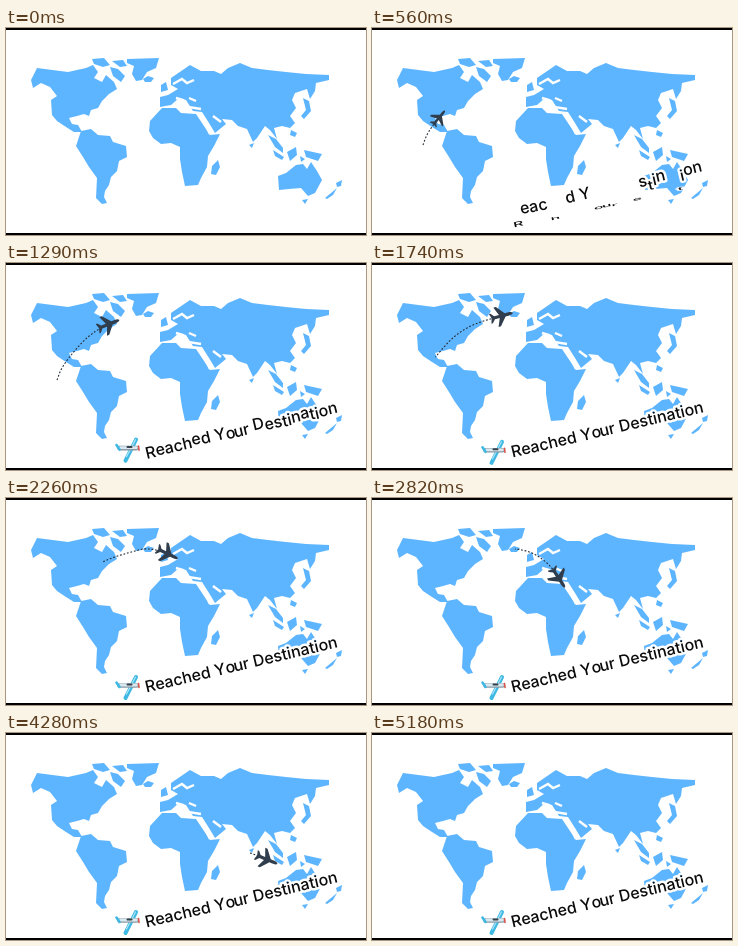
Write an HTML page with a canvas that moves like this. It is 360x207 px and loops after 5.21 s.

```html
<!DOCTYPE html>
<html lang="en">
<head>
<meta charset="utf-8">
<title>Reached Your Destination</title>
<style>
  html, body { margin: 0; width: 100%; height: 100%; overflow: hidden; background: #fff; }
  canvas { display: block; }
</style>
</head>
<body>
<canvas id="stage" width="360" height="207"></canvas>
<script>
const ctx = document.getElementById('stage').getContext('2d');
const LOOP = 5210;
const clamp = (v, lo = 0, hi = 1) => Math.min(hi, Math.max(lo, v));

const land = new Path2D([
  // North America, its islands and Greenland
  'M25 52L31 40 62 44 80 40 87 37 92 44 88 50 96 54 100 47 108 54 111 61 103 66 96 73 92 80 85 82 83 88 78 86 71 88 63 90 66 96 72 97 76 104 68 104 60 99 51 93 46 87 45 72 51 68 44 59 35 55 27 60Z',
  'M86 31L98 30 104 37 97 39 88 36Z M104 39L112 41 119 48 115 54 107 48Z M106 33L117 32 121 38 114 39Z',
  'M121 31L153 30 150 40 141 44 136 52 130 53 126 46 128 38 121 35Z',
  // South America
  'M75 103L85 101 92 107 104 108 107 114 120 118 121 129 113 133 111 143 105 149 103 157 99 163 98 169 101 175 96 176 90 170 91 150 83 139 77 129 70 118Z',
  // Iceland and Britain
  'M137 51L142 48 148 50 145 54 139 54Z M155 57L160 54 162 62 155 64Z',
  // Eurasia
  'M165 50L184 37 195 43 208 43 215 46 222 40 234 35 246 40 262 42 280 44 300 46 323 47 323 52 310 55 309 63 304 71 301 61 289 65 286 72 290 80 284 88 289 95 284 100 276 98 268 100 271 111 264 102 259 98 251 110 247 114 241 101 232 98 226 92 216 91 220 96 209 105 203 95 196 84 187 83 180 72 173 70 165 77 154 79 154 69 162 67 172 61 165 57Z',
  // Africa and Madagascar
  'M144 93L156 80 170 80 175 85 190 86 198 98 204 107 214 106 208 118 202 128 201 139 195 150 192 157 179 158 176 144 174 131 174 119 165 115 155 116 147 110 143 103Z',
  'M206 138L212 132 214 139 210 147 205 146Z',
  // East Asian islands
  'M297 70L303 73 305 83 298 91 295 88 300 82Z M285 102L291 105 289 109 284 107Z M243 117L248 115 246 120Z',
  'M262 107L270 111 277 120 277 125 269 119Z M267 122L278 129 276 132 269 128Z M281 124L290 119 291 127 284 133Z M298 122L316 126 312 133 300 129Z M294 128L299 131 295 134Z',
  // Australia, Tasmania, New Zealand
  'M272 148L280 145 290 137 297 136 301 141 305 134 311 143 316 152 309 165 302 168 295 160 283 161 273 162Z M296 172L302 171 299 176Z',
  'M330 155L336 152 335 158 331 159Z M319 170L331 160 327 167 321 171Z'
].join(' '));

const water = new Path2D('M167 56L176 51 181 55 188 52 M170 70L177 72 182 79 195 81 M183 70L190 73 M195 87L204 106 M207 88L215 94');

const airliner = new Path2D('M12 0C11 -1.6 9 -1.8 4 -1.7L-3 -10H-5.5L-2 -1.6H-7L-10 -5H-11.5L-10 0 -11.5 5H-10L-7 1.6H-2L-5.5 10H-3L4 1.7C9 1.8 11 1.6 12 0Z');

const stops = [[51,117],[56,105],[66,91],[82,74],[101,62],[129,53],[142,51],[160,55],
  [176,66],[186,79],[200,101],[217,113],[247,121],[277,134],[302,150]];

// Catmull-Rom curve sampled with its running length
function sampleRoute() {
  const out = [], at = i => stops[clamp(i, 0, stops.length - 1)];
  for (let i = 0; i < stops.length - 1; i++) {
    const [a, b, c, d] = [at(i - 1), at(i), at(i + 1), at(i + 2)];
    for (let k = i ? 1 : 0; k <= 20; k++) {
      const u = k / 20;
      const [x, y] = [0, 1].map(n => b[n] + u / 2 * (c[n] - a[n] +
        u * (2 * a[n] - 5 * b[n] + 4 * c[n] - d[n] + u * (3 * (b[n] - c[n]) + d[n] - a[n]))));
      const last = out[out.length - 1];
      out.push({ x, y, len: last ? last.len + Math.hypot(x - last.x, y - last.y) : 0 });
    }
  }
  return out;
}
const route = sampleRoute();
const total = route[route.length - 1].len;
const START = 60, SPEED = 0.063, END = START + total / SPEED;

function pointAt(len) {
  const i = clamp(route.findIndex(p => p.len >= len), 1, route.length - 1);
  const a = route[i - 1], b = route[i], u = (len - a.len) / (b.len - a.len);
  return { x: a.x + (b.x - a.x) * u, y: a.y + (b.y - a.y) * u, angle: Math.atan2(b.y - a.y, b.x - a.x) };
}

function drawMap() {
  ctx.fillStyle = '#fff';
  ctx.fillRect(0, 0, 360, 207);
  ctx.fillStyle = '#5eb5ff';
  ctx.fill(land);
  ctx.strokeStyle = '#fff';
  ctx.lineWidth = 2.4;
  ctx.stroke(water);
}

function drawFlight(t) {
  if (t <= START || t >= END) return;
  const head = (t - START) * SPEED;
  const tail = clamp((t - 1440) * 0.0868, 0, head);
  const plane = pointAt(head), from = pointAt(tail);
  const size = clamp(Math.min(t - START + 60, END - t) / 700);

  ctx.save();
  ctx.beginPath();
  ctx.moveTo(from.x, from.y);
  route.filter(p => p.len > tail && p.len < head).forEach(p => ctx.lineTo(p.x, p.y));
  ctx.lineTo(plane.x, plane.y);
  ctx.setLineDash([1.8, 1.8]);
  ctx.lineDashOffset = tail;
  ctx.strokeStyle = '#222b35';
  ctx.lineWidth = 1.1;
  ctx.stroke();

  ctx.translate(plane.x, plane.y);
  ctx.rotate(plane.angle);
  ctx.scale(size, size);
  ctx.fillStyle = '#303d4c';
  ctx.fill(airliner);
  ctx.restore();
}

const TEXT = 'Reached Your Destination';
const delays = [505,380,390,400,530,590,340,0,340,525,525,535,0,600,530,400,455,420,340,600,530,440,380,350];

// Each letter unfolds from its baseline, then bobs until it settles
function letterPose(u) {
  const fade = Math.pow(clamp(1 - u / 1250), 1.3);
  return { stretch: clamp(u / 130), dy: 8 * fade * Math.cos(u * Math.PI * 2 / 420) };
}

function eachLetter(t, paint) {
  [...TEXT].forEach((ch, i) => {
    const u = t - delays[i];
    if (u <= 0 || ch === ' ') return;
    const { stretch, dy } = letterPose(u);
    ctx.save();
    ctx.translate(ctx.measureText(TEXT.slice(0, i)).width, dy);
    ctx.scale(1, stretch);
    paint(ch);
    ctx.restore();
  });
}

function drawText(t) {
  ctx.save();
  ctx.translate(140.5, 194.5);
  ctx.rotate(-0.232);
  ctx.font = '500 16px Inter, "Liberation Sans", sans-serif';
  ctx.lineJoin = 'round';
  ctx.lineWidth = 5;
  ctx.strokeStyle = '#fff';
  ctx.fillStyle = '#0b0b0b';
  eachLetter(t, ch => ctx.strokeText(ch, 0, 0));
  eachLetter(t, ch => ctx.fillText(ch, 0, 0));
  ctx.restore();
}

function line(color, width, x1, y1, x2, y2) {
  ctx.strokeStyle = color;
  ctx.lineWidth = width;
  ctx.beginPath();
  ctx.moveTo(x1, y1);
  ctx.lineTo(x2, y2);
  ctx.stroke();
}

function drawSmallPlane(t) {
  const u = t - 620;
  if (u <= 0) return;
  const { stretch, dy } = letterPose(u);
  ctx.save();
  ctx.translate(121.5, 189 + dy);
  ctx.scale(1, stretch);
  ctx.lineCap = 'round';
  line('#3fb9e4', 4, 8.5, -10, -2, 11);
  line('#a9e4f6', 1.2, 8, -10, -1, 7);
  line('#8a9aa6', 4.6, -8, -1.5, 9, -1.5);
  line('#d9e8ee', 2.8, -7, -2, 9, -2);
  line('#3fb9e4', 2.6, -11, -4.5, -8, 0);
  line('#33424d', 2, 0, -2.5, 4, -2.5);
  line('#d9534a', 1.6, 11, -3.5, 11.5, 0.5);
  ctx.restore();
}

function frame() {
  const t = performance.now() % LOOP;
  drawMap();
  drawFlight(t);
  drawText(t);
  drawSmallPlane(t);
  ctx.fillStyle = '#000';
  ctx.fillRect(0, 0, 360, 2);
  ctx.fillRect(0, 205, 360, 2);
  requestAnimationFrame(frame);
}
frame();
</script>
</body>
</html>
```
